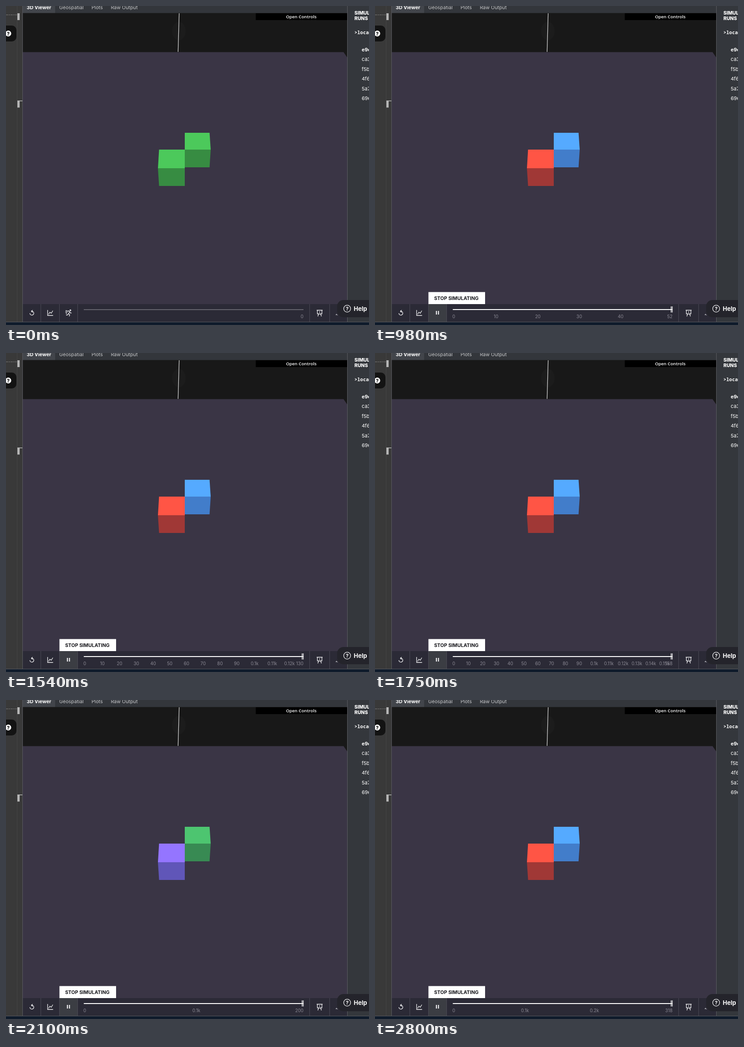
An HTML page for the animation above (2870 ms loop, 798 px wide and 702 px high).

```html
<!DOCTYPE html>
<html lang="en">
<head>
<meta charset="utf-8">
<title>Simulation viewer</title>
<style>
  html, body { margin: 0; width: 100%; height: 100%; overflow: hidden; background: #34373c; }
  svg { display: block; font-family: Inter, sans-serif; }
  .tab { font-size: 10.7px; fill: #c9cacd; }
  .bold { font-weight: 700; }
  .white { fill: #fff; }
  .icon { fill: none; stroke: #f2f2f4; stroke-width: 1.3; }
  .tick { font-size: 9.8px; fill: #8a8893; }
</style>
</head>
<body>
<svg width="798" height="702" viewBox="0 0 798 702">
  <!-- left panel -->
  <rect width="37" height="696" fill="#393939"/>
  <path d="M24.5 0V695" stroke="#444"/>
  <path d="M0 19.5H24" stroke="#777" stroke-dasharray="5 1 3 1"/>
  <path d="M25 16h5v15h-5zM25 209h5v14.500h-5zM25 208h11v1.500h-11z" fill="#b5b5b5"/>
  <rect x="-20" y="43" width="43" height="35" rx="10" fill="#131313"/>
  <circle cx="5" cy="60.500" r="6.500" fill="#fff"/>
  <text x="5" y="64.500" text-anchor="middle" font-size="11" font-weight="800" fill="#131313">?</text>

  <!-- tabs -->
  <rect x="37" width="713" height="16" fill="#33363b"/>
  <rect x="37" width="71" height="16" fill="#42454b"/>
  <text class="tab bold" x="45.500" y="6.500" style="fill:#fff">3D Viewer</text>
  <text class="tab" x="117" y="6.500">Geospatial</text>
  <text class="tab" x="188" y="6.500">Plots</text>
  <text class="tab" x="230.500" y="6.500">Raw Output</text>

  <!-- viewport -->
  <rect x="37" y="15.500" width="713" height="100" fill="#181818"/>
  <ellipse cx="380" cy="55" rx="15" ry="20" fill="#1c1c1c"/>
  <path d="M380.700 16L378.300 101" stroke="#e4e4e4" stroke-width="1.200"/>
  <path d="M37 101.500H742L750 113V656H37z" fill="#3a3545"/>
  <rect x="549" y="16" width="201" height="15" fill="#000"/>
  <text class="white" x="649" y="27" text-anchor="middle" font-size="9.700" font-weight="600" style="font-family:'Open Sans',sans-serif">Open Controls</text>
  <g id="cubes"></g>

  <!-- right panel -->
  <rect x="750" width="48" height="696" fill="#34373c"/>
  <g class="white" font-size="10.500">
    <text x="766" y="18.500" font-weight="800">SIMULATION</text>
    <text x="766" y="31" font-weight="800">RUNS</text>
    <text class="bold" x="766" y="62" style="font-family:'Noto Sans Mono',monospace">&gt;loca</text>
    <g id="runs"></g>
  </g>

  <!-- bottom bar -->
  <rect x="37" y="656" width="713" height="39" fill="#2b2a36"/>
  <rect id="hover" x="118" y="656" width="39" height="39" fill="#3b3d43"/>
  <path d="M76.500 656V695M117.500 656V695M157.500 656V695M667.500 656V695M711.500 656V695" stroke="#4b4a56"/>
  <path d="M36.500 0V695M750.500 0V695M0 695.500H798" stroke="#5a5b60"/>
  <rect y="696" width="798" height="6" fill="#0f1b2b"/>
  <g class="icon">
    <path d="M56 671.800A4.300 4.300 0 1 1 52.500 676M58.500 669.300L55.700 671.800L58.500 674.300"/>
    <path d="M91.500 669V681H103.500M93.500 678.500L96.500 674L99.500 676L103 670.500"/>
    <path d="M683 669.500H696M684.500 669.500V677.500H694.500V669.500M687.500 677.500L685.500 683M691.500 677.500L693.500 683M689.500 672V675"/>
    <path d="M725.500 680L727 678M728.500 679.500V680.500"/>
    <g id="runner">
      <path d="M134.500 671.500L137.500 671L140 673L137.500 677L140 679.500L139 683M137.500 677L135 680H132M140 673L141.500 675.500H144M131 670.500H134M130.500 673.500H135M131.500 676.500H134"/>
      <circle cx="141.500" cy="669.700" r="1.200"/>
    </g>
    <path id="pause" d="M135 671V679M139.500 671V679" stroke-width="2.200"/>
  </g>
  <path id="track"/>
  <path id="thumb" d="M651 661V674.500M653.500 661V674.500" stroke="#fff" stroke-width="1.400"/>
  <g id="ticks"></g>
  <g id="tip">
    <rect id="tipBox" x="117.500" y="629.500" height="26.500" fill="#fff"/>
    <text id="tipText" class="bold" x="130" y="647" font-size="10.600" fill="#17171c"></text>
  </g>

  <!-- help button -->
  <rect x="728" y="647" width="90" height="38" rx="14" fill="#24242b"/>
  <circle class="icon" cx="750" cy="666" r="7.600" stroke-width="1.500"/>
  <text class="white bold" x="750" y="670" text-anchor="middle" font-size="11">?</text>
  <text class="white bold" x="764.500" y="670.800" font-size="13">Help</text>
</svg>
<script>
const $ = id => document.getElementById(id);
const LOOP = 2870, STEP = 70, HOVER = 210, START = 610;
const PERIOD = 630, PEAK = 1027;  // the cubes keep swapping between two colour pairs

// top face, front face
const green = [[76, 201, 91], [55, 140, 66]];
const red = [[255, 85, 69], [160, 56, 54]];
const blue = [[85, 170, 255], [66, 125, 202]];
const purple = [[133, 122, 305], [87, 90, 203]];  // over-lit top, clipped on output

const counts = [[START, 0], [980, 52], [1540, 130], [1890, 176], [2100, 200], [2800, 318], [LOOP, 329]];

const clamp = v => Math.max(0, Math.min(1, v));
const rgb = c => `rgb(${c.map(v => Math.min(255, Math.round(v)))})`;
const mix = (a, b, k) => a.map((face, i) => face.map((v, j) => v + (b[i][j] - v) * k));

function count(t) {
  for (let i = 1; i < counts.length; i++) {
    const [t0, n0] = counts[i - 1], [t1, n1] = counts[i];
    if (t <= t1) return Math.round(n0 + (n1 - n0) * clamp((t - t0) / (t1 - t0)));
  }
}

const cube = (top, front, [light, dark]) =>
  `<path d="M${top}z" fill="${rgb(light)}"/><path d="M${front}z" fill="${rgb(dark)}"/>`;

function drawCubes(t) {
  const wave = clamp(0.5 + 1.29 * Math.cos((t - PEAK) / PERIOD * 2 * Math.PI));
  const k = t < START ? 0 : wave;
  const rest = t < PEAK ? green : purple;
  $('cubes').innerHTML =
    cube('393 279H447.500L450 316H393', '393 316H450L447.500 355H393', mix(green, blue, k)) +
    cube('336.500 316H393V357H334', '334 357H393V396H336.500', mix(rest, red, k));
}

const tick = (x, s, anchor = 'start') =>
  `<text class="tick" x="${x}" y="686.500" text-anchor="${anchor}">${s}</text>`;

function drawTicks(n) {
  let out = tick(654, n, 'end');
  const gap = Math.max(1, 10 ** Math.floor(Math.log10(Math.max(n, 1) / 2)));
  for (let v = 0; v < n - gap / 2; v += gap)
    out += tick(170 + v / (n + 1) * 482, v < 100 ? v : v / 1000 + 'k');
  $('ticks').innerHTML = out;
}

const show = (id, on) => $(id).setAttribute('visibility', on ? 'visible' : 'hidden');

function draw(t) {
  const running = t >= START;
  drawCubes(t);
  drawTicks(count(t));
  show('hover', t >= HOVER);
  show('tip', t >= HOVER);
  show('runner', !running);
  show('pause', running);
  show('thumb', running);
  $('tipBox').setAttribute('width', running ? 124.5 : 131);
  $('tipText').textContent = (running ? 'STOP' : 'START') + ' SIMULATING';
  $('track').setAttribute('d', running ? 'M171 667H654V669H171z' : 'M171 667.500H654V669H171z');
  $('track').setAttribute('fill', running ? '#fff' : '#77757f');
}

$('runs').innerHTML = ['e9e', 'ca3', 'f5b', '4f6', '5a7', '69e'].map((id, i) =>
  `<text x="782" y="${99.5 + i * 21.5}" font-size="11" font-weight="${i ? 400 : 700}">${id}</text>`).join('');

const begin = performance.now();
function loop() {
  const t = (performance.now() - begin) % LOOP;
  draw(Math.floor(t / STEP) * STEP);
  requestAnimationFrame(loop);
}
loop();
</script>
</body>
</html>
```
